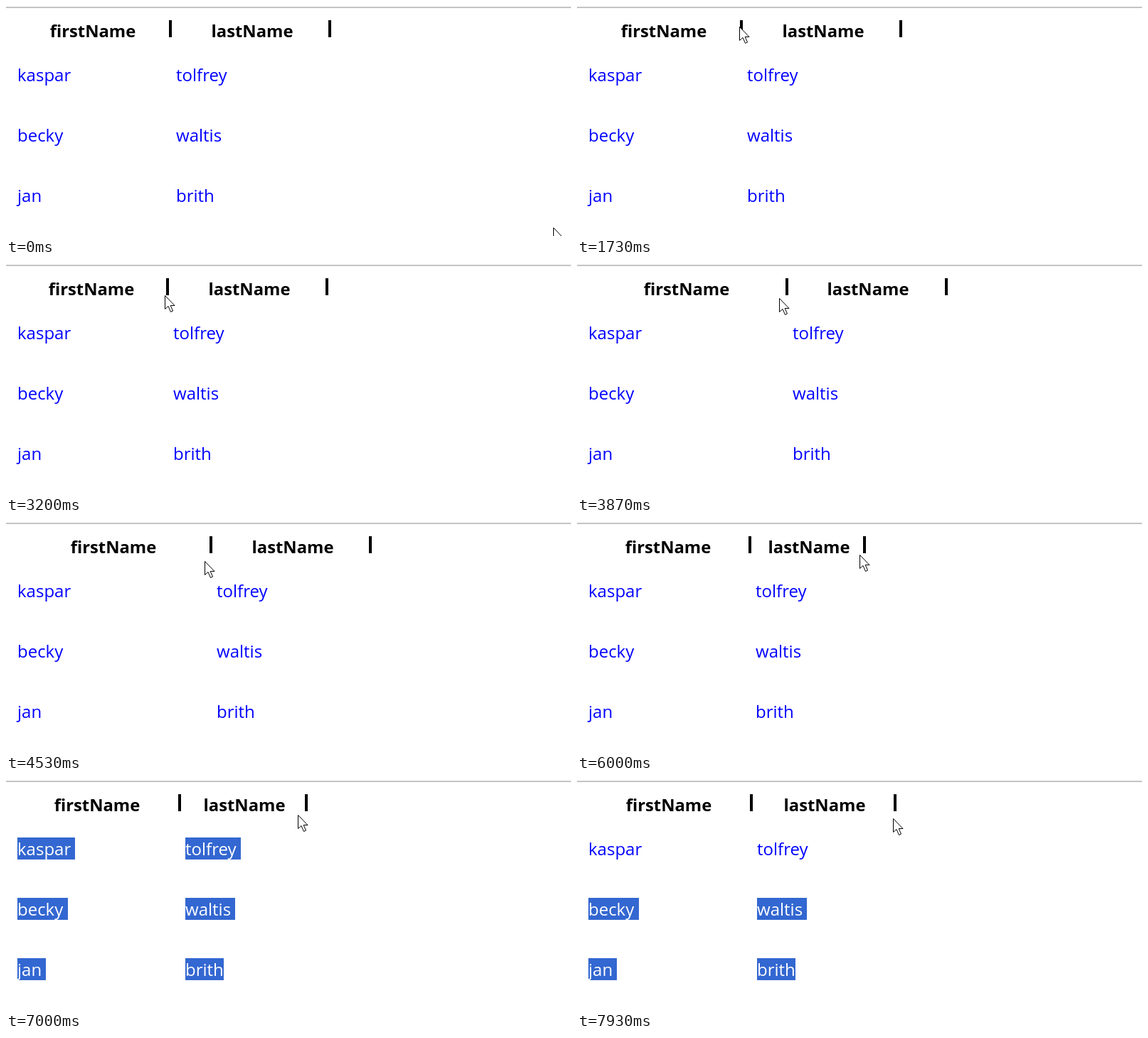
Animation of 794x324 px, one loop 8000 ms. Source, as an HTML page:

```html
<!DOCTYPE html>
<html lang="en">
<head>
<meta charset="utf-8">
<title>Resizable columns</title>
<style>
  html, body { margin: 0; width: 100%; height: 100%; overflow: hidden; background: #fff; }
  #stage { position: relative; width: 794px; height: 324px; overflow: hidden;
    font: 24px/31px "Open Sans", "Noto Sans", sans-serif; }
  #stage > * { position: absolute; left: 0; top: 0; white-space: pre; }
  #stage .rule { top: 1px; width: 100%; height: 2px; background: #c4c4c4; }
  #stage .head { top: 20px; width: 200px; font-size: 23.8px; font-weight: 700; text-align: center; }
  #stage .bar { top: 20px; width: 4px; height: 24px; background: #000; }
  .cell { height: 31px; color: #00f; }
  .cell.selected { color: #fff; background: #3367d1; }
</style>
</head>
<body>
<div id="stage"><div class="rule"></div></div>
<script>
const LOOP = 8000, FPS = 15;
const DRAG_1 = 2267, DROP_1 = 4640, DRAG_2 = 5533;
const GRIP = -3, LAG = 8; // pointer offset in px, divider delay in ms

// Each move: start time, time per swing, then the stops it eases through
const FIRST_EDGE = [[DRAG_1, 500, 231, 360, 221], [3400, 310, 221, 396, 197, 414, 243], [6467, 1467, 243, 245]];
const SECOND_WIDTH = [[DRAG_2, 255, 224, 357, 147, 368, 137, 405, 140, 407, 209], [7900, 33, 209, 202]];
const POINTER_X = [[0, 367, 769, 166, 194], [800, 267, 194, 236, 233], [1467, 267, 233, 228], [DROP_1, 313, 240, 475, 469]];
const POINTER_Y = [[0, 367, 312, 40, 15], [800, 267, 15, 34, 30], [1467, 267, 30, 29], [DRAG_1, 933, 29, 44],
  [3400, 1133, 44, 55], [DROP_1, 313, 55, 18, 21], [DRAG_2, 467, 21, 46, 47, 49, 52, 54]];

const ROWS = [['kaspar ', 'tolfrey '], ['becky ', 'waltis '], ['jan ', 'brith']];

const stage = document.getElementById('stage');

function add(className, text = '') {
  const el = document.createElement('div');
  el.className = className;
  el.textContent = text;
  return stage.appendChild(el);
}

const heads = ['firstName', 'lastName'].map(text => add('head', text));
const bars = [add('bar'), add('bar')];
const cells = ROWS.map((row, r) => row.map(text => {
  const el = add('cell', text);
  el.style.top = 81 + 85 * r + 'px';
  return el;
}));
stage.insertAdjacentHTML('beforeend',
  `<svg width="16" height="26"><path d="M.5 .5V19.5L5 15.5L8.5 23.5L11.5 22L8.2 14.5H14Z"
    fill="#fff" stroke="#000"/></svg>`);
const pointer = stage.lastElementChild;

const place = (el, x) => { el.style.left = Math.round(x) + 'px'; };
const ease = u => (1 - Math.cos(Math.PI * u)) / 2;

function follow(moves, t) {
  const [start, step, ...stops] = moves.findLast(move => move[0] <= t) ?? moves[0];
  const pos = Math.min(Math.max((t - start) / step, 0), stops.length - 1);
  const i = Math.floor(pos);
  const [from, to = from] = stops.slice(i);
  return from + (to - from) * ease(pos - i);
}

const firstEdge = t => follow(FIRST_EDGE, t);
const secondEdge = t => firstEdge(t) + follow(SECOND_WIDTH, t);

function pointerX(t) {
  if (t >= DRAG_2) return secondEdge(t + LAG) + GRIP;
  if (t >= DRAG_1 && t < DROP_1) return firstEdge(t + LAG) + GRIP;
  return follow(POINTER_X, t);
}

function render(time) {
  // The picture updates at a fixed rate
  const t = Math.floor((time + 4) * FPS / 1000) * 1000 / FPS;
  const first = firstEdge(t), second = secondEdge(t), y = follow(POINTER_Y, t);

  place(heads[0], (first + 13) / 2 - 100);
  place(heads[1], (first + second) / 2 - 97.5);
  place(bars[0], first - 2);
  place(bars[1], second - 2);

  // Dragging the second divider downwards selects text from the pointer on
  const selectFrom = t < DRAG_2 || y < 46.5 ? ROWS.length : y < 52 ? 0 : 1;
  cells.forEach((row, r) => row.forEach((el, c) => {
    place(el, c ? first + 8 : 16);
    el.classList.toggle('selected', r >= selectFrom);
  }));

  place(pointer, pointerX(t));
  pointer.style.top = Math.round(y) + 'px';
}

function tick() {
  render(performance.now() % LOOP);
  requestAnimationFrame(tick);
}
tick();
</script>
</body>
</html>
```
